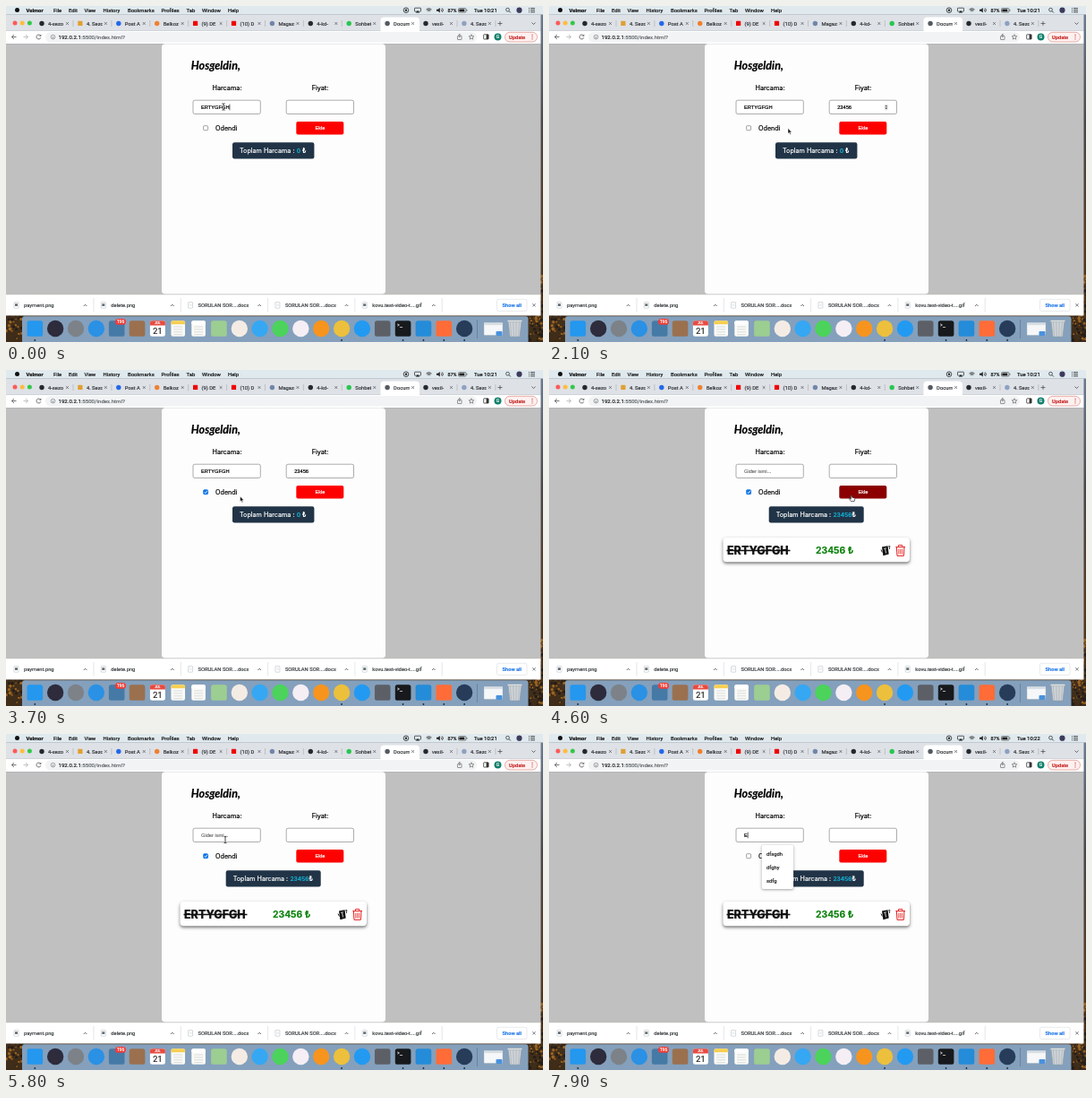
Write an HTML page with a canvas that moves like this. It is 600 by 375 pixels and loops after 8000 ms.

```html
<!DOCTYPE html>
<html lang="tr">
<head>
<meta charset="utf-8">
<title>Harcama</title>
<style>
html, body { margin: 0; width: 100%; height: 100%; overflow: hidden; background: #c0c0c0; }
canvas { display: block; width: 100vw; height: 100vh; }
</style>
</head>
<body>
<canvas id="stage"></canvas>
<script>
const W = 600, H = 375, LOOP = 8000, STEP = 100;
const UI = 'Roboto, sans-serif', PAGE = 'Inter, sans-serif', FIELD = '"Liberation Sans", Arial, sans-serif';
const canvas = document.getElementById('stage');
const c = canvas.getContext('2d');

// [time, x, y] of the pointer
const path = [
  [0, 243, 112.5], [400, 243, 112.5], [900, 338, 114], [1800, 338, 114], [2100, 267, 136.5],
  [2500, 224, 136], [2900, 224, 136], [3400, 261.5, 141], [3700, 261.5, 141], [4200, 338, 140],
  [5000, 338, 140], [5600, 245, 118], [5800, 245, 118], [6100, 224, 136], [6300, 224, 136], [6600, 224, 117.5]
];

function pointer(t) {
  const i = path.findIndex(p => p[0] > t);
  if (i < 0) return path[path.length - 1].slice(1);
  const [t0, x0, y0] = path[i - 1], [t1, x1, y1] = path[i];
  const u = (t - t0) / (t1 - t0), k = u * u * (3 - 2 * u);
  return [x0 + (x1 - x0) * k, y0 + (y1 - y0) * k];
}

function rect(x, y, w, h, fill, r = 0, stroke, lw = 0.7) {
  c.beginPath();
  c.roundRect(x, y, w, h, r);
  if (fill) { c.fillStyle = fill; c.fill(); }
  if (stroke) { c.strokeStyle = stroke; c.lineWidth = lw; c.stroke(); }
}

function disc(x, y, r, fill, stroke, lw = 0.7) {
  c.beginPath();
  c.arc(x, y, r, 0, Math.PI * 2);
  if (fill) { c.fillStyle = fill; c.fill(); }
  if (stroke) { c.strokeStyle = stroke; c.lineWidth = lw; c.stroke(); }
}

function line(pts, color, lw = 0.7) {
  c.beginPath();
  for (let i = 0; i < pts.length; i += 2) c.lineTo(pts[i], pts[i + 1]);
  c.strokeStyle = color;
  c.lineWidth = lw;
  c.stroke();
}

function poly(pts, fill, stroke, lw) {
  c.beginPath();
  for (let i = 0; i < pts.length; i += 2) c.lineTo(pts[i], pts[i + 1]);
  c.closePath();
  c.fillStyle = fill;
  c.fill();
  if (stroke) { c.strokeStyle = stroke; c.lineWidth = lw; c.lineJoin = 'round'; c.stroke(); }
}

// A hairline stroke gives small type a fuller weight.
function text(s, x, y, size, color = '#111', font = UI, weight = 400, align = 'left') {
  c.font = `${weight} ${size}px ${font}`;
  c.textAlign = align;
  c.fillStyle = c.strokeStyle = color;
  c.lineWidth = 0.2;
  c.lineJoin = 'round';
  c.fillText(s, x, y);
  c.strokeText(s, x, y);
}

function cross(x, y, r, color) {
  line([x - r, y - r, x + r, y + r], color);
  line([x - r, y + r, x + r, y - r], color);
}

function shadow(color, blur, dy) {
  const k = canvas.width / W;
  c.shadowColor = color;
  c.shadowBlur = blur * k;
  c.shadowOffsetY = dy * k;
}

function desktop() {
  const g = c.createLinearGradient(0, 0, 0, H);
  g.addColorStop(0, '#6c7f95');
  g.addColorStop(0.35, '#4a4648');
  g.addColorStop(0.7, '#553a22');
  g.addColorStop(1, '#3e2c18');
  rect(0, 0, W, H, g);
  let seed = 7;
  const rnd = () => (seed = seed * 16807 % 2147483647) / 2147483647;
  for (let i = 0; i < 160; i++) {
    const x = rnd() < 0.5 ? rnd() * 20 : 582 + rnd() * 18;
    disc(x, 300 + rnd() * 75, 0.6 + rnd() * 1.4, rnd() < 0.5 ? '#9a6422' : '#241d19');
  }
}

function menuBar(t) {
  rect(0, 0, W, 9.6, '#dfe9ee');
  disc(12.5, 4.6, 2.5, '#111');
  text('Velmor', 22.5, 6.8, 5.9, '#111', UI, 700);
  const items = [['File', 53], ['Edit', 70], ['View', 87.5], ['History', 108.5], ['Bookmarks', 136],
    ['Profiles', 173.5], ['Tab', 201.5], ['Window', 219], ['Help', 248]];
  items.forEach(([s, x]) => text(s, x, 6.8, 5.9));
  disc(447, 4.7, 2.8, null, '#222', 0.8);
  rect(445.9, 3.6, 2.2, 2.2, '#222');
  rect(456.5, 2.2, 7, 4, null, 0.6, '#222');
  poly([457.8, 7.5, 460, 5, 462.2, 7.5], '#222');
  for (const r of [1.4, 2.8, 4.2]) {
    c.beginPath();
    c.arc(472.5, 7, r, -2.36, -0.78);
    c.strokeStyle = '#222';
    c.lineWidth = 0.8;
    c.stroke();
  }
  poly([481, 3.7, 482.7, 3.7, 484.8, 2, 484.8, 7.4, 482.7, 5.7, 481, 5.7], '#222');
  for (const r of [1.6, 3.1]) {
    c.beginPath();
    c.arc(485.2, 4.7, r, -0.8, 0.8);
    c.stroke();
  }
  text('87%', 493.5, 6.7, 5.4);
  rect(505.5, 2.6, 8.5, 4.4, null, 1, '#333', 0.6);
  rect(506.3, 3.4, 6, 2.8, '#222', 0.5);
  rect(514.6, 4, 0.7, 1.6, '#333');
  text(t < 6400 ? 'Tue 10:21' : 'Tue 10:22', 523, 6.8, 5.9);
  disc(560.5, 4.2, 1.9, null, '#222');
  line([562, 5.6, 563.8, 7.4], '#222', 0.9);
  disc(573.5, 4.7, 3.1, '#3d3a5c');
  for (const y of [2.6, 4.7, 6.8]) {
    line([584, y, 585, y], '#222', 0.8);
    line([586, y, 591, y], '#222', 0.8);
  }
}

function tabs() {
  rect(0, 9.6, 597.5, 18, '#dee1e6');
  ['#fc5b57', '#fdbc40', '#34c84a'].forEach((col, i) => disc(10 + i * 8.2, 19, 2.5, col));
  rect(418.5, 12.5, 43.5, 16, '#fff', [4, 4, 0, 0]);
  const list = [['4-sezo', '#24292e'], ['4. Sezo', '#e0a030', 1], ['Post A', '#2468e8'], ['Belkoz', '#f08030'],
    ['(9) DE', '#f00000', 1], ['(10) D', '#f00000', 1], ['Magaza', '#7186aa'], ['4-kd-', '#24292e'],
    ['Sohbet', '#28c750'], ['Docum', '#555a60'], ['vexil-', '#24292e'], ['4. Sezo', '#8da2c2']];
  list.forEach(([name, col, square], i) => {
    const x = 40 + i * 42.9;
    if (square) rect(x - 2.6, 16.8, 5.2, 5.2, col, 0.6);
    else disc(x, 19.5, 2.7, col);
    c.save();
    c.beginPath();
    c.rect(x + 6, 12, 18.8, 14);
    c.clip();
    text(name, x + 7, 21.5, 5.8, '#35383c');
    c.restore();
    cross(x + 28.5, 19.5, 1.4, '#4c5055');
    if (i !== 8 && i !== 9) line([x + 35, 16, x + 35, 23], '#9ca0a6', 0.5);
  });
  line([552, 17, 552, 22], '#444');
  line([549.5, 19.5, 554.5, 19.5], '#444');
  line([587.5, 18.5, 589.5, 20.5, 591.5, 18.5], '#444', 0.8);
}

function toolbar() {
  rect(0, 27.5, 597.5, 14.8, '#fff');
  line([11.5, 34.5, 6.5, 34.5], '#555', 0.8);
  line([9, 32, 6.5, 34.5, 9, 37], '#555', 0.8);
  line([19.5, 34.5, 24.5, 34.5], '#b0b3b6', 0.8);
  line([22, 32, 24.5, 34.5, 22, 37], '#b0b3b6', 0.8);
  c.beginPath();
  c.arc(36.5, 34.5, 2.5, 0.3, 5.5);
  c.strokeStyle = '#555';
  c.lineWidth = 0.8;
  c.stroke();
  poly([37.1, 33.7, 39.3, 33.7, 39.3, 31.5], '#555');
  rect(44, 29, 482, 11.5, '#f1f3f4', 5.7);
  disc(52.5, 34.6, 2.3, null, '#5f6368', 0.6);
  line([52.5, 34.2, 52.5, 36], '#5f6368', 0.7);
  text('192.0.2.1', 58.5, 36.8, 6.1, '#202124');
  const w = c.measureText('192.0.2.1').width;
  text(':5500/index.html?', 58.5 + w, 36.8, 6.1, '#5f6368');
  rect(504.5, 33.5, 4.6, 4, null, 0.5, '#555', 0.6);
  line([506.8, 35.5, 506.8, 31.4], '#555', 0.6);
  line([505.5, 32.6, 506.8, 31.2, 508.1, 32.6], '#555', 0.6);
  const star = [];
  for (let i = 0; i < 10; i++) {
    const a = i * Math.PI / 5 - Math.PI / 2, r = i % 2 ? 1.3 : 3;
    star.push(520 + r * Math.cos(a), 34.7 + r * Math.sin(a));
  }
  poly(star, '#f1f3f4', '#555', 0.6);
  rect(533.7, 31.8, 5.4, 5.2, null, 0.5, '#333', 0.8);
  rect(536.6, 31.8, 2.5, 5.2, '#333');
  disc(549.5, 34.5, 4, '#10806c');
  text('G', 549.5, 36.3, 5, '#fff', UI, 400, 'center');
  rect(557.5, 29.3, 36, 10.7, '#fdf1f0', 5.3, '#e08a83', 0.7);
  text('Update', 562, 36.6, 5.7, '#c5221f', UI, 500);
  for (const y of [32.4, 34.6, 36.8]) disc(588, y, 0.6, '#c5221f');
}

function downloads() {
  rect(0, 321.7, 597.5, 23.8, '#fff');
  line([0, 322, 597.5, 322], '#cdd0d3', 0.6);
  const files = [['payment.png', '#66727a'], ['delete.png', '#66727a'], ['SORULAN SOR....docx', '#eef1f4'],
    ['SORULAN SOR....docx', '#eef1f4'], ['kovu.test-video-t....gif', '#66727a']];
  files.forEach(([name, col], i) => {
    const x = i * 97.3;
    rect(x + 9, 330.6, 5, 6.6, '#fff', 0.4, '#aeb4b9', 0.5);
    rect(x + 10, 332.2, 3, 2.8, col);
    text(name, x + 20, 335.9, 5.8, '#3c4043');
    line([x + 86.8, 335, x + 88.6, 333.2, x + 90.4, 335], '#444', 0.8);
    line([x + 98, 326, x + 98, 341.5], '#d4d6d9', 0.6);
  });
  rect(548.5, 327.3, 33.5, 13.2, '#fff', 2, '#d8dade', 0.6);
  text('Show all', 565.3, 335.9, 5.7, '#1a73e8', UI, 500, 'center');
  cross(590, 333.8, 1.7, '#4a4d50');
}

function dock() {
  rect(18, 346.3, 565.5, 32, '#84a0bc', 3);
  const y = 360;
  const apps = ['#2497ef', 'o#2d2b3c', 'o#7d8288', 'o#2a91e5', '#467aa6', '#9b704e', 'cal', 'note#f6cf52',
    'note#ffffff', '#9dce91', 'o#f4ece4', 'o#36a7f3', 'o#4bd35b', 'o#f5eef4', 'o#f7941e', 'o#ecc03c', 'o#229af2',
    '#5c6066', '#17191c', '#248cd8', '#ff6c37', 'o#263c58'];
  apps.forEach((app, i) => {
    const x = 32.3 + i * 22.85;
    if (app === 'cal') calendar(x, y);
    else if (app.startsWith('note')) note(x, y, app.slice(4));
    else if (app[0] === 'o') disc(x, y, 9.2, app.slice(1));
    else rect(x - 8.8, y - 8.8, 17.6, 17.6, app, 2.6);
  });
  text('>_', 437, 357.5, 5, '#eee', '"Noto Sans Mono", monospace');
  rect(122, 349, 12, 6.8, '#f13d37', 3.4);
  text('196', 128, 354.3, 5, '#fff', UI, 400, 'center');
  for (const i of [0, 15, 18, 19, 20, 21]) disc(32.3 + i * 22.85, 373, 0.9, '#1b2530');
  line([526.5, 350, 526.5, 371], '#5f7891', 0.7);
  rect(534, 353.5, 21, 14, '#f5f7f9', 0.8, '#9eabb7', 0.4);
  rect(534, 353.5, 21, 2.6, '#d8dde2');
  rect(547.5, 363, 7, 5, '#4a92dc', 1);
  poly([561, 352, 576, 352, 574, 369, 563, 369], '#cfd4d8', '#8d979f', 0.6);
  for (let i = 0; i < 4; i++) line([563.5 + i * 3.3, 353, 564.5 + i * 2.7, 368], '#9fa8af', 0.6);
  rect(560.2, 350.8, 16.6, 1.7, '#eceeef', 0.8, '#8d979f', 0.4);
}

function note(x, y, head) {
  rect(x - 7.8, y - 8.8, 15.6, 17.6, '#fafaf7', 2);
  rect(x - 7.8, y - 8.8, 15.6, 4, head, [2, 2, 0, 0]);
  for (let i = 0; i < 4; i++) line([x - 5, y - 2 + i * 2.9, x + 5, y - 2 + i * 2.9], '#c2c4c6', 0.6);
}

function calendar(x, y) {
  rect(x - 8.5, y - 8.8, 17, 17.6, '#fff', 2.4);
  rect(x - 8.5, y - 8.8, 17, 5.2, '#e84b40', [2.4, 2.4, 0, 0]);
  text('JUL', x, y - 4.8, 3.6, '#fff', UI, 500, 'center');
  text('21', x, y + 6, 9, '#222', UI, 400, 'center');
}

function field(x, value, hint) {
  rect(x, 105.2, 75.3, 15.3, '#fff', 1.8, '#808080', 0.65);
  text(value || hint, x + 9, 115, 5.7, value ? '#000' : '#757575', FIELD);
  return x + 9.4 + (value ? c.measureText(value).width : 0);
}

function caret(x) {
  line([x, 109.5, x, 116.4], '#000', 0.6);
}

function form(t, added, hover) {
  text('Hosgeldin,', 206.8, 70.6, 12.5, '#000', 'Lato, sans-serif', 'italic 700');
  text('Harcama:', 247, 94, 7.3, '#000', PAGE, 400, 'center');
  text('Fiyat:', 351, 94, 7.3, '#000', PAGE, 400, 'center');

  const name = added ? (t < 7700 ? '' : 'E') : 'ERTYGFGH';
  const digits = t < 1000 || added ? 0 : Math.min(5, 1 + Math.floor((t - 1000) / 200));
  const endName = field(209, name, 'Gider ismi...');
  const endPrice = field(313.2, '23456'.slice(0, digits), '');
  if (t < 700 && t % 1000 < 500 || t >= 7700) caret(endName);
  if (t >= 800 && t < 2000) caret(endPrice);
  if (t >= 800 && t < 2700) {
    rect(374.3, 109.4, 5, 7, '#efefef', 0.8);
    poly([375.4, 112.2, 376.8, 110.4, 378.2, 112.2], '#444');
    poly([375.4, 113.6, 376.8, 115.4, 378.2, 113.6], '#444');
  }

  const checked = t >= 2700 && t < 6200;
  rect(220.6, 133.7, 5, 5, checked ? '#0b72e7' : '#fff', 1, checked ? '#0b72e7' : '#777', 0.7);
  if (checked) line([221.6, 136.3, 222.8, 137.5, 224.8, 134.8], '#fff', 0.9);
  text('Odendi', 234, 138.8, 7.2, '#000', PAGE);
  rect(324.3, 129, 53, 14.4, hover ? '#8b0000' : '#ff0000', 2);
  text('Ekle', 351, 138.2, 5.7, '#fff', FIELD, 400, 'center');
}

function total(added) {
  const x = added ? 245.7 : 253, w = added ? 106 : 91.4;
  rect(x, 152.2, w, 18.2, '#213447', 2.2);
  text('Toplam Harcama :', x + 8, 163.8, 7.2, '#fff', PAGE);
  text(added ? '23456' : '0', x + 71.8, 163.8, 6.7, '#13b5d8', PAGE, 500);
  text('₺', x + (added ? 92.8 : 78), 163.8, 7.2, '#fff', PAGE, 600);
}

function expense() {
  c.save();
  shadow('rgba(0,0,0,.55)', 3.5, 1.8);
  rect(194.5, 187, 208.5, 27.3, '#fff', 4);
  c.restore();
  text('ERTYGFGH', 199, 205.5, 12.5, '#111', PAGE, 800);
  line([198.5, 201.5, 269.5, 201.5], '#111', 1.5);
  text('23456 ₺', 298, 205, 10.3, '#0a800a', PAGE, 700);

  poly([372, 197.4, 378.5, 196.2, 379.7, 205.4, 373.4, 207.2], '#111');
  line([374, 199.4, 377, 198.8], '#fff', 0.7);
  line([375.6, 199.5, 376.5, 204.5], '#fff', 0.8);
  line([379, 197.2, 380.8, 196.4, 380.4, 200], '#111', 0.8);
  line([371, 200.5, 372.4, 203.5], '#111', 0.9);

  const red = '#e51b1b';
  line([387.3, 197.6, 398, 197.6], red, 1);
  line([390.5, 197.3, 390.5, 195.5, 394.8, 195.5, 394.8, 197.3], red, 0.9);
  line([388.4, 198, 389, 207.4, 396.3, 207.4, 396.9, 198], red, 1);
  for (const x of [390.8, 392.65, 394.5]) line([x, 199.6, x, 205.6], red, 0.8);
}

function suggestions() {
  c.save();
  shadow('rgba(0,0,0,.4)', 3, 0.8);
  rect(237.7, 124, 35.4, 49, '#fff', 2);
  c.restore();
  ['dfsgdh', 'dfghy', 'sdfg'].forEach((s, i) => text(s, 243, 135.6 + i * 15, 5.8, '#222'));
}

function cursor(x, y, kind) {
  c.save();
  c.translate(x, y);
  if (kind === 'beam') {
    for (const [col, lw] of [['#fff', 1.5], ['#111', 0.8]]) {
      line([0, -3.3, 0, 3.3], col, lw);
      line([-1.5, -3.8, 0, -3.2, 1.5, -3.8], col, lw);
      line([-1.5, 3.8, 0, 3.2, 1.5, 3.8], col, lw);
    }
  } else if (kind === 'hand') {
    poly([-0.7, 0, 0.5, 0, 0.7, 2.2, 3.2, 2.7, 3.8, 3.5, 3.2, 6.5, -0.6, 6.5, -2.6, 3.8, -2, 3.2, -0.7, 4.2],
      '#fff', '#111', 0.6);
  } else {
    poly([0, 0, 0, 5.9, 1.4, 4.7, 2.4, 6.9, 3.4, 6.4, 2.4, 4.4, 4.2, 4.3], '#111', '#fff', 0.5);
  }
  c.restore();
}

function draw(t) {
  const k = canvas.width / W;
  c.setTransform(k, 0, 0, k, 0, 0);
  const added = t >= 4400;
  const [x, y] = pointer(t);
  const onButton = x > 324 && x < 378 && y > 129 && y < 144;
  const onField = y > 105 && y < 121 && (x > 209 && x < 285 || x > 313 && x < 389);

  desktop();
  menuBar(t);
  tabs();
  toolbar();
  rect(0, 42.3, 597.5, 279.4, '#c0c0c0');
  rect(174, 42.3, 250, 279.2, '#fdfdfd', 4);
  form(t, added, onButton);
  total(added);
  if (added) expense();
  if (t >= 6900) suggestions();
  downloads();
  dock();

  const typing = t >= 1000 && t < 1900 || t >= 7700;
  if (!typing) cursor(x, y, onButton ? 'hand' : onField ? 'beam' : 'arrow');
}

function resize() {
  const k = window.devicePixelRatio || 1;
  canvas.width = Math.round(W * k);
  canvas.height = Math.round(H * k);
}

let last = -1;
function tick() {
  const t = Math.floor(performance.now() % LOOP / STEP) * STEP;
  if (t !== last) draw(last = t);
  requestAnimationFrame(tick);
}

resize();
tick();
</script>
</body>
</html>
```
